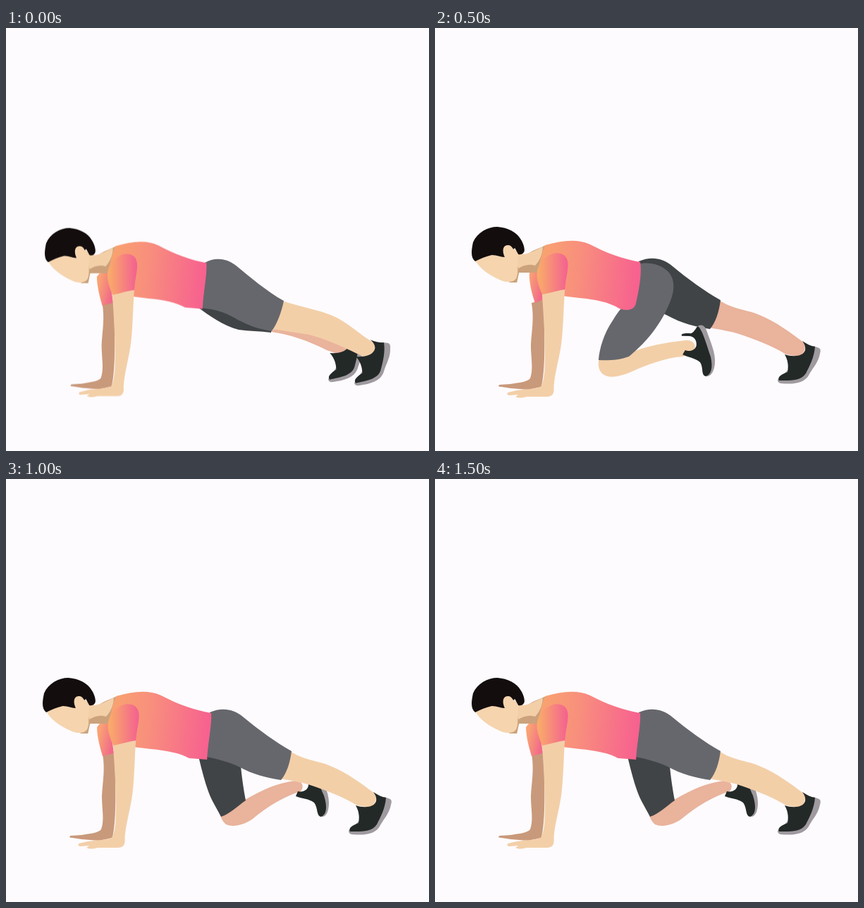
Animation, 600 px wide and 600 px high, one loop 1.6 s. Source, as an HTML page:

```html
<!DOCTYPE html>
<html lang="en">
<head>
<meta charset="utf-8">
<title>Mountain climber</title>
<style>
html, body { margin: 0; width: 100%; height: 100%; overflow: hidden; background: #fdfbfe; }
svg { display: block; width: 100vw; height: 100vh; }
.skin { fill: #f3cfa8; }
.farSkin { fill: #e9b39c; }
.farArm { fill: #c9997b; }
.shade { fill: #cba27c; }
.face { fill: #f5d4ae; }
.hair { fill: #130d0e; }
.shorts { fill: #66676c; }
.farShorts { fill: #404446; }
.shoe { fill: #232927; }
.sole { fill: #9f9a9f; }
</style>
</head>
<body>
<svg id="stage" viewBox="0 0 600 600">
  <defs>
    <linearGradient id="shirt" gradientUnits="userSpaceOnUse" x1="150" x2="290" y1="330" y2="345">
      <stop stop-color="#f9a36f"/><stop offset=".4" stop-color="#f88f7d"/><stop offset="1" stop-color="#f7628f"/>
    </linearGradient>
    <linearGradient id="sleeve" gradientUnits="userSpaceOnUse" x1="148" x2="188" y1="345" y2="345">
      <stop stop-color="#f9ab6a"/><stop offset="1" stop-color="#f4648f"/>
    </linearGradient>
    <linearGradient id="farSleeve" gradientUnits="userSpaceOnUse" x1="132" x2="154" y1="365" y2="370">
      <stop stop-color="#f9a273"/><stop offset="1" stop-color="#f2698a"/>
    </linearGradient>
  </defs>
</svg>
<script>
const stage = document.getElementById('stage');
const STEP = 200;

const path = (cls, d) => `<path class="${cls}" d="${d}"/>`;
const fill = (id, d) => `<path fill="url(#${id})" d="${d}"/>`;
const move = (transform, ...parts) => `<g transform="${transform}">${parts.join('')}</g>`;

// Head, shirt and arms; the hem and the far sleeve vary by pose
const hems = {
  flat: 'C295 350 289 375 288 398 L262 396',
  tucked: 'C297 350 291 377 288 390 C286 400 276 402 264 398'
};
const farSleeves = {
  back: 'M134 347 L130 352 C130 365 134 380 138 393 L154 389 L149 346Z',
  front: 'M135 347 C134 358 138 376 143 390 L155 385 L149 346Z'
};
const upper = (matrix, hem, far) => move(`matrix(${matrix})`,
  path('farArm', 'M138 390 C142 412 138 430 137 450 C137 468 141 484 136 497 C132 502 120 503 108 505 L92 506 Q88 509 95 509 L108 511 L133 513 L152 509 C157 490 158 450 155 385Z'),
  fill('farSleeve', farSleeves[far]),
  path('shade', 'M115 330 L106 361 L117 361 L120 347 L147 347 C152 335 155 320 161 307 L140 316Z'),
  path('skin', 'M110 313 L127 321 C138 319 146 314 154 310 C154 320 150 330 143 337 C134 334 126 337 119 341Z'),
  path('face', 'M57 329 C62 340 76 350 92 357 C103 362 112 361 116 355 C119 349 118 340 118 333 L113 310 L82 314Z'),
  path('hair', 'M57 331 C51 326 51 318 54 304 C60 290 75 282 89 282 C104 283 117 290 122 299 C127 306 129 315 127 318 Q124 322 119 321 L114 312 L99 325 C93 325 89 322 81 322 C72 324 65 327 57 331Z'),
  path('face', 'M101 327 C96 320 95 308 104 308 C111 307 112 318 119 321 L118 334Z'),
  fill('shirt', `M158 308 C180 302 202 298 222 307 C245 319 270 328 294 332 ${hems[hem]} C250 389 230 385 207 383 L182 380 L152 375 C148 365 144 355 146 345 C151 333 152 318 158 308Z`),
  path('skin', 'M153 376 C155 405 158 445 157 475 C157 490 155 504 151 509 C140 513 128 512 117 514 L104 517 Q101 521 107 521 L119 520 L115 523 Q120 526 131 523 L160 523 Q169 523 170 515 C169 496 178 470 181 446 C184 420 184 392 186 369Z'),
  fill('sleeve', 'M162 323 C172 316 186 319 189 328 C193 338 187 352 186 371 C176 372 164 376 153 378 C152 366 146 355 146 345 C149 335 152 328 162 323Z')
);

const plantedShoe = t => move(t,
  path('sole', 'M537 451 L545 454 Q548 456 546 462 C544 474 536 482 531 491 C525 503 512 506 490 504 Q486 503 486 499Z'),
  path('shoe', 'M521 444 C527 448 533 451 539 452 C538 467 531 480 526 490 C519 501 504 500 488 500 C485 495 492 491 500 488 C502 478 500 470 496 463 C508 467 522 466 525 457 C526 452 524 448 521 444Z'));

const liftedShoe = t => move(t,
  path('sole', 'M460 418 C464 412 471 413 474 419 C482 437 492 454 492 470 C492 483 488 491 481 490Z'),
  path('shoe', 'M462 416 C469 420 478 444 485 460 C490 476 489 487 481 490 C474 489 477 478 471 470 C463 464 455 465 445 461 L448 454 C456 456 463 451 463 445 C463 438 459 432 452 432 L441 433 C438 429 448 428 453 428 C457 427 459 420 462 416Z'));

const legBack = cls => path(cls, 'M403 386 C422 399 445 400 460 407 C485 417 505 433 523 446 C528 455 522 464 515 466 L498 463 C480 452 460 444 440 437 C425 431 405 428 389 425Z');
const shortsBack = cls => path(cls, 'M289 331 C305 324 322 325 337 338 C360 357 382 373 405 386 C403 402 398 418 390 427 C370 424 350 419 330 408 C318 402 300 397 284 394Z');
const rearLeg = (skin, shorts) => legBack(skin) + plantedShoe('') + shortsBack(shorts);

const TORSO = '.988 0 0 1 .6 0';
const near = ['skin', 'shorts'], far = ['farSkin', 'farShorts'];
const swivel = 'rotate(-12 510 463)';

const poses = {
  plank:
    path('farSkin', 'M376 431 C400 434 430 444 455 457 L470 462 Q482 462 487 452 C460 436 420 425 385 422Z') +
    plantedShoe('translate(-37 -5) ' + swivel) +
    path('farShorts', 'M272 396 C288 408 308 422 330 428 C345 430 360 430 376 432 L380 405 L300 388Z') +
    path('skin', 'M392 387 C420 396 444 400 463 408 C486 418 500 434 521 446 C528 455 520 466 507 466 C485 456 460 443 430 435 L378 427Z') +
    plantedShoe(swivel) +
    path('shorts', 'M282 333 C295 325 312 326 325 336 C345 352 370 374 394 387 C391 402 385 419 377 430 C357 427 345 422 329 414 C313 404 298 399 276 397Z') +
    upper('.948 0 0 .99 5.7 4.5', 'flat', 'back'),

  nearMid:
    move('translate(4 3)', rearLeg(...far)) +
    path('skin', 'M317 475 L354 448 C385 443 415 437 440 433 L453 431 C462 433 466 441 463 448 L450 457 C425 463 400 472 380 485 C365 498 355 504 343 502 C330 498 322 488 317 475Z') +
    liftedShoe('') +
    path('shorts', 'M289 338 C302 331 320 334 330 344 C345 358 352 385 353 407 L356 449 C342 455 331 470 317 477 C308 465 297 435 293 415 C289 400 287 370 289 338Z') +
    upper('1 0 0 1 0 0', 'flat', 'back'),

  nearFront:
    rearLeg(...far) +
    path('skin', 'M233 468 L272 463 C300 450 330 446 355 443 C367 442 371 449 368 459 L352 466 C325 468 300 478 280 487 C262 495 245 498 237 490 C231 484 231 475 233 468Z') +
    liftedShoe('translate(-93 32) scale(1 .94) rotate(6 465 452)') +
    path('shorts', 'M288 335 C302 331 319 335 329 344 C342 356 340 374 332 392 C318 425 295 450 275 466 C262 471 245 472 232 471 C233 455 240 432 252 415 C258 405 263 398 270 392Z') +
    upper(TORSO, 'tucked', 'front'),

  farMid:
    path('farSkin', 'M304 477 L339 455 C365 440 385 431 410 428 C420 428 424 436 418 443 C395 450 370 465 350 482 C335 492 322 494 312 490 Q306 485 304 477Z') +
    liftedShoe('translate(-34 -11)') +
    path('farShorts', 'M273 393 C276 405 283 437 293 457 L305 479 C318 475 328 464 340 456 C337 440 334 420 333 406 L315 392Z') +
    rearLeg(...near) +
    upper(TORSO, 'flat', 'back'),

  farFront:
    path('farSkin', 'M233 470 L291 446 C310 443 330 441 345 437 Q358 444 353 460 C335 463 310 471 295 477 C270 490 255 495 242 492 C234 488 232 480 233 470Z') +
    liftedShoe('translate(-102 8)') +
    path('farShorts', 'M262 392 C250 410 235 440 232 473 C250 476 274 464 292 448 C300 435 310 415 319 400 L300 388Z') +
    rearLeg(...near) +
    upper(TORSO, 'flat', 'front')
};

const cycle = ['plank', 'nearMid', 'nearFront', 'nearMid', 'plank', 'farMid', 'farFront', 'farMid'];

for (const [name, art] of Object.entries(poses)) {
  const g = document.createElementNS('http://www.w3.org/2000/svg', 'g');
  g.innerHTML = art;
  stage.append(g);
  const frames = [...cycle, cycle[0]].map((pose, i) => ({
    offset: i / cycle.length,
    opacity: pose === name ? 1 : 0,
    easing: 'step-end'
  }));
  const anim = g.animate(frames, { duration: STEP * cycle.length, iterations: Infinity });
  anim.startTime = document.timeline.currentTime;
}
</script>
</body>
</html>
```
